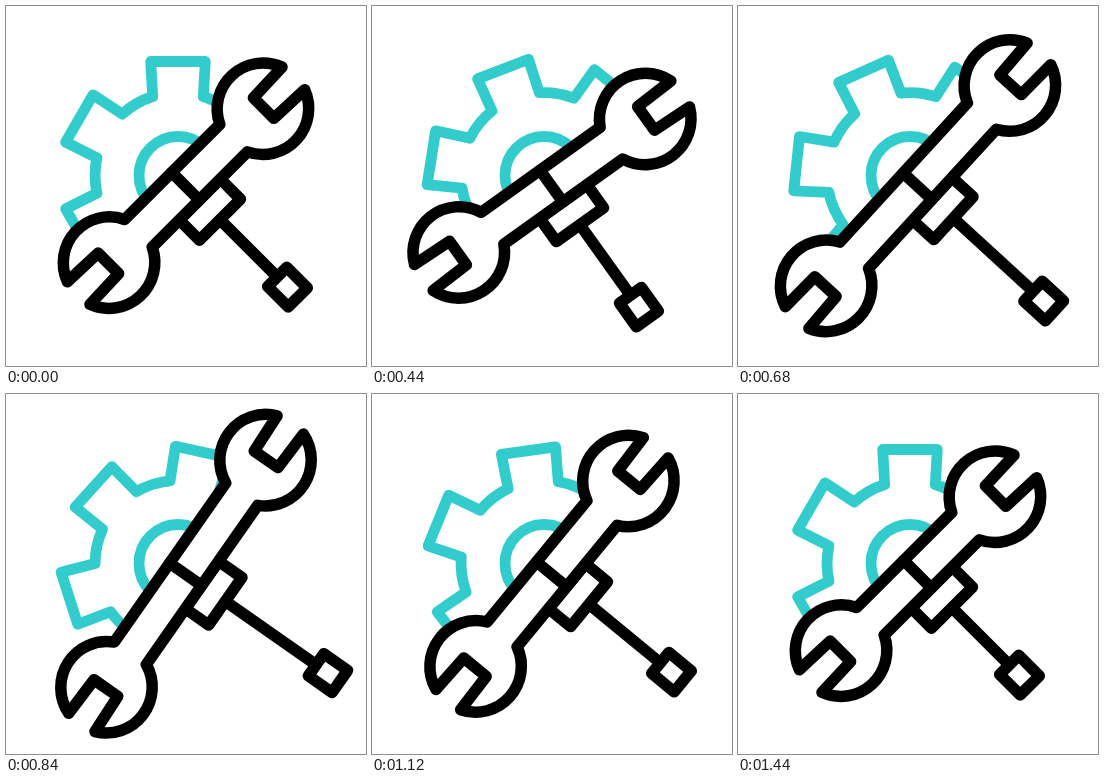
Recreate the animation shown at these times as an HTML page. Size 360 px wide and 360 px high, loop 1480 ms.

```html
<!DOCTYPE html>
<html lang="en">
<head>
<meta charset="utf-8">
<title>Tools</title>
<style>
  html, body { margin: 0; width: 100%; height: 100%; overflow: hidden; background: #fff; }
  svg { display: block; width: 100vw; height: 100vh; }
  .line { fill: #fff; stroke: #000; stroke-width: 11.5; stroke-linecap: round; stroke-linejoin: round; }
  .gear { fill: none; stroke: #33cccc; stroke-width: 10.8; stroke-linejoin: round; }
  .mask { fill: #fff; }
</style>
</head>
<body>
<svg viewBox="0 0 360 360">
  <g class="gear" transform="translate(172 169.5)">
    <path id="teeth"/>
    <circle r="39"/>
  </g>
  <g id="tools">
    <!-- hides the gear below the wrench and inside its jaws -->
    <rect class="mask" x="-200" width="400" height="200"/>
    <circle class="mask" id="jawA" r="46"/>
    <circle class="mask" id="jawB" r="46"/>
    <path class="line" id="shaft"/>
    <rect class="line" id="bit" x="-13.5" y="-14.5" width="27" height="29"/>
    <rect class="line" x="-29" y="19.5" width="58" height="28.5"/>
    <path class="line" id="wrench"/>
    <path class="line" d="M-.7-19.5V19.5"/>
  </g>
</svg>
<script>
const LOOP = 1480, STEP = 40, REST = 80;
const $ = id => document.getElementById(id);
const set = (id, name, value) => $(id).setAttribute(name, value);

const clamp = x => Math.min(1, Math.max(0, x));
const sine = u => (1 - Math.cos(Math.PI * u)) / 2;

// Cubic bezier ease with control points (x1, 0) and (x2, 1)
function bezier(x1, x2, u) {
  let lo = 0, hi = 1, s = 0.5;
  for (let i = 0; i < 24; i++) {
    s = (lo + hi) / 2;
    const r = 1 - s;
    if (3 * r * r * s * x1 + 3 * r * s * s * x2 + s ** 3 < u) lo = s; else hi = s;
  }
  return s * s * (3 - 2 * s);
}

// Keys are [time, value] pairs
function track(keys, t) {
  let value = keys[0][1];
  for (let i = 1; i < keys.length; i++) {
    const [t0, v0] = keys[i - 1], [t1, v1] = keys[i];
    if (t >= t0) value = v0 + (v1 - v0) * sine(clamp((t - t0) / (t1 - t0)));
  }
  return value;
}

const TILT = [[80, 45], [465, 35.5], [840, 55], [1440, 45]];
const SLIDE = [[300, 0], [785, 30.5], [1360, 0]];

function gearPath() {
  const at = (x, y, deg) => {
    const a = deg * Math.PI / 180, c = Math.cos(a), s = Math.sin(a);
    return (x * c - y * s).toFixed(2) + ' ' + (x * s + y * c).toFixed(2);
  };
  let d = '';
  for (let deg = 0; deg < 360; deg += 60) {
    d += (deg ? 'A83 83 0 0 1 ' : 'M') + at(-25.3, -79, deg) +
      'L' + at(-27.3, -114, deg) + 'L' + at(27.3, -114, deg) + 'L' + at(25.3, -79, deg);
  }
  return d + 'A83 83 0 0 1 ' + at(-25.3, -79, 0) + 'Z';
}

function wrenchPath(reach) {
  const half = k => {
    const p = (x, y) => `${k * (reach + x)} ${k * y}`;
    return p(-41.5, -19.5) + 'A46 46 0 0 1 ' + p(43, -16) + 'L' + p(1, -14.5) +
      'L' + p(1, 14.5) + 'L' + p(43, 16) + 'A46 46 0 0 1 ' + p(-41.5, 19.5);
  };
  return `M${half(1)}L${half(-1)}Z`;
}

function draw(t) {
  const slide = track(SLIDE, t), reach = 108.8 + slide;
  const turn = 180 * bezier(0.365, 0.54, clamp((t - REST) / 1240));
  set('teeth', 'transform', `rotate(${turn})`);
  set('tools', 'transform', `translate(180 179.7) rotate(${-track(TILT, t)})`);
  set('wrench', 'd', wrenchPath(reach));
  set('jawA', 'cx', reach);
  set('jawB', 'cx', -reach);
  set('shaft', 'd', `M0 48V${129 + slide}`);
  set('bit', 'transform', `translate(0 ${143.5 + slide})`);
}

set('teeth', 'd', gearPath());
const start = performance.now();

// The motion runs at 25 poses per second, with a short rest at the start
function tick() {
  const t = (performance.now() - start + 1) % LOOP;
  draw(Math.max(REST, Math.floor(t / STEP) * STEP));
  requestAnimationFrame(tick);
}
tick();
</script>
</body>
</html>
```
